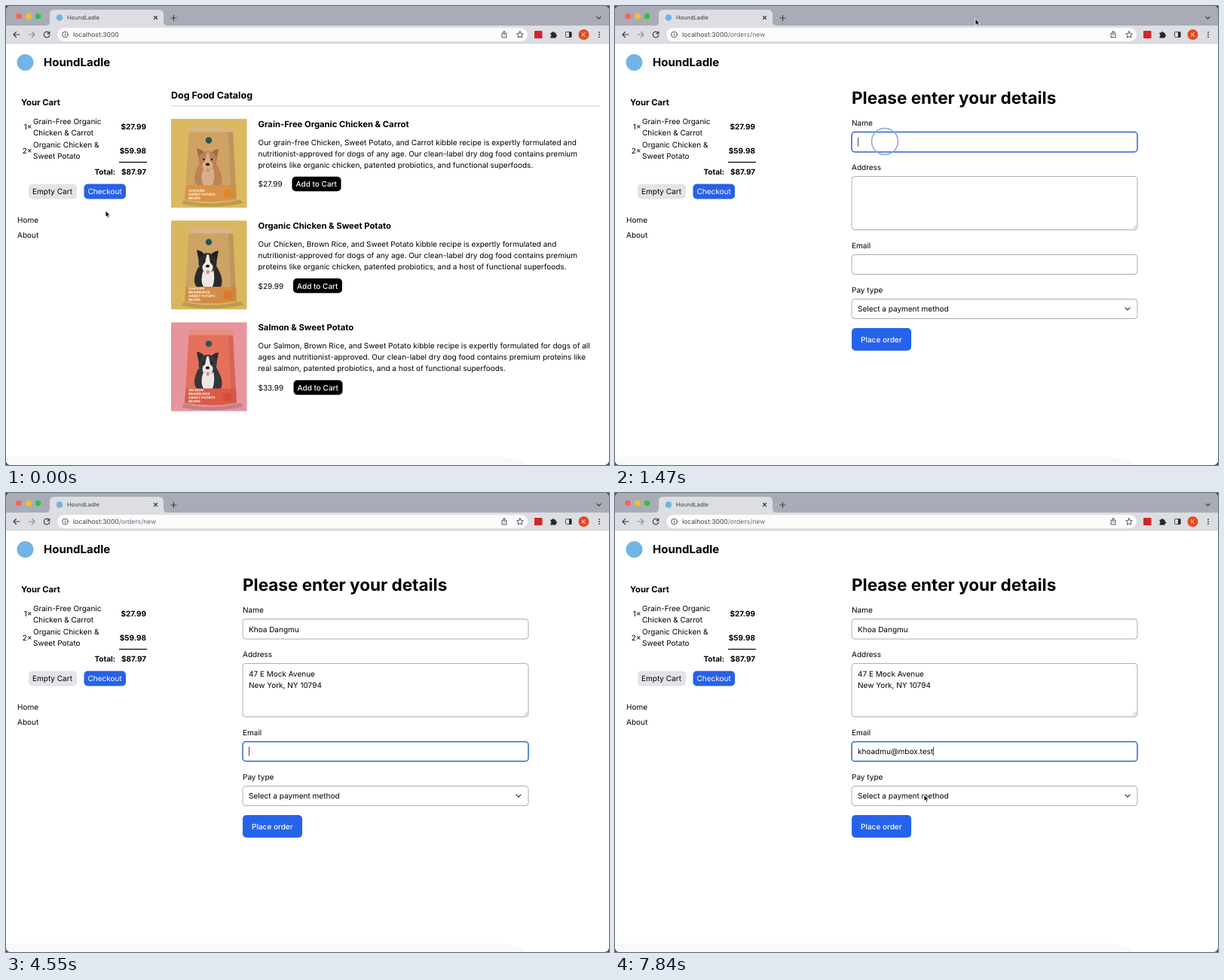
Animation, 800 px wide and 610 px high, one loop 8 s. Source, as an HTML page:

```html
<!DOCTYPE html>
<html lang="en">
<head>
<meta charset="utf-8">
<title>Shop checkout</title>
<style>
  html, body { margin: 0; width: 100%; height: 100%; overflow: hidden; background: #4a4a4c; }
  svg { display: block; width: 800px; height: 610px; }
  text { font: 400 10px Inter, sans-serif; fill: #000; text-rendering: geometricPrecision; white-space: pre; }
  .b { font-weight: 700; }
  .m { font-weight: 500; }
  .w { fill: #fff; }
  .end { text-anchor: end; }
  .h3 { font-size: 11.25px; }
  .h2 { font-size: 12.5px; }
  .brand { font-size: 15px; }
  .h1 { font-size: 22.5px; }
  .tab { font-size: 7.5px; fill: #3c4043; }
  .url { font-size: 8.6px; fill: #3c4043; }
  .pack { font-size: 4.5px; font-weight: 800; fill: #f8efd8; }
  .icon { fill: none; stroke: #3c4043; stroke-width: 1.2; stroke-linecap: round; stroke-linejoin: round; }
  .field { fill: #fff; stroke: #a9adb4; stroke-width: 1; }
  .field.on { stroke: #2f60d8; stroke-width: 1.5; }
</style>
</head>
<body>
<svg viewBox="0 0 800 610">
  <defs><clipPath id="win"><rect width="800" height="610" rx="6"/></clipPath></defs>
  <g clip-path="url(#win)">
    <rect width="800" height="610" fill="#fff"/>
    <path d="M0 599H655Q682 600 689 610H0Z" fill="#f9f9f9"/>

    <!-- browser bar -->
    <rect width="800" height="27" fill="#a9acb6"/>
    <rect y="26" width="800" height="24" fill="#dcdee4"/>
    <rect y="49" width="800" height="1" fill="#cfd1d6"/>
    <path d="M53 26Q58 26 58 21V11Q58 5 64 5H202Q209 5 209 11V21Q209 26 214 26Z" fill="#dcdee4"/>
    <circle cx="17" cy="13.5" r="3.8" fill="#f95f57"/>
    <circle cx="30" cy="13.5" r="3.8" fill="#f9bd2e"/>
    <circle cx="42.5" cy="13.5" r="3.8" fill="#2bc440"/>
    <circle cx="71" cy="15.5" r="4.3" fill="#72b4e6"/>
    <text class="tab" x="81" y="18.3">HoundLadle</text>
    <g class="icon">
      <path d="M196.5 13.5l4 4m0-4l-4 4M219 16h7m-3.5-3.5v7M784 14.5l2.5 2.5 2.5-2.5"/>
      <path d="M18 38h-8m3.5-3.5L10 38l3.5 3.5M57.6 36.5A3.8 3.8 0 1 0 57.8 39M57.8 34v2.8h-2.8"/>
      <path d="M30 38h8m-3.5-3.5L38 38l-3.5 3.5" stroke="#8c9096"/>
    </g>
    <rect x="68" y="29" width="624" height="18" rx="9" fill="#fbfbfc"/>
    <g class="icon" style="stroke-width:.9">
      <circle cx="78.5" cy="38" r="3.8"/><path d="M78.5 37.7v2M78.5 36v.1"/>
      <path d="M659.5 36.3h-1.5v5.5h6v-5.5h-1.5M661 39v-5.5m-1.7 1.7l1.7-1.7 1.7 1.7"/>
      <path d="M682 33.7l1.3 2.8 3 .4-2.2 2.1.5 3-2.6-1.5-2.6 1.5.5-3-2.2-2.1 3-.4z"/>
      <rect x="742.5" y="34.5" width="7.5" height="7" rx="1"/>
    </g>
    <text class="url" x="89" y="41">localhost:3000<tspan id="path" fill="#666a70">/orders/new</tspan></text>
    <rect x="701" y="33" width="10.5" height="10" rx="1" fill="#d3232b"/>
    <path d="M722.500 35.500h2a1.500 1.500 0 0 1 3 0h2v2.200a1.500 1.500 0 0 1 0 3V42.500h-7v-2a1.500 1.500 0 0 0 0-2.800z" fill="#24272b"/>
    <rect x="747" y="34.500" width="3.300" height="7" fill="#24272b"/>
    <circle cx="766.500" cy="38" r="7" fill="#e8471d"/>
    <text class="w" x="766.500" y="40.800" text-anchor="middle" style="font-size:8px">K</text>
    <path d="M787 35v.1m0 2.9v.1m0 2.900v.1" class="icon" style="stroke-width:1.900"/>

    <!-- header and cart -->
    <circle cx="25.500" cy="75" r="11" fill="#72b4e6"/>
    <text class="b brand" x="50" y="80">HoundLadle</text>
    <text class="b h3" x="20" y="132">Your Cart</text>
    <text class="end" x="34.500" y="164.300">1×</text>
    <text x="36" y="157">Grain-Free Organic</text>
    <text x="36" y="172">Chicken &amp; Carrot</text>
    <text class="b end" x="186" y="164.300">$27.99</text>
    <text class="end" x="34.500" y="195.500">2×</text>
    <text x="36" y="188">Organic Chicken &amp;</text>
    <text x="36" y="203">Sweet Potato</text>
    <text class="b end" x="186" y="195.500">$59.98</text>
    <rect x="150" y="207" width="37" height="1.200"/>
    <text class="b end" x="145" y="224.300">Total:</text>
    <text class="b end" x="186" y="224.300">$87.97</text>
    <rect x="30" y="236.500" width="64" height="20" rx="5" fill="#e2e4e8"/>
    <text x="35" y="250">Empty Cart</text>
    <rect x="103.500" y="236.500" width="55.500" height="20" rx="5" fill="#2761e8"/>
    <text class="w" x="108.500" y="250">Checkout</text>
    <text x="15" y="288">Home</text>
    <text x="15" y="307.500">About</text>

    <g id="catalog">
      <text class="b h2" x="219" y="122.500">Dog Food Catalog</text>
      <rect x="219" y="132.200" width="569" height="1.300" fill="#d8d9dc"/>
    </g>

    <g id="order">
      <text class="b h1" x="314" y="130">Please enter your details</text>
      <text x="314" y="158.700">Name</text>
      <text x="314" y="217.500">Address</text>
      <text x="314" y="321.500">Email</text>
      <text x="314" y="380.500">Pay type</text>
      <rect class="field" x="314" y="167.500" width="379" height="26.500" rx="4"/>
      <rect class="field" x="314" y="226.500" width="379" height="71" rx="4"/>
      <rect class="field" x="314" y="330.500" width="379" height="26" rx="4"/>
      <rect class="field" x="314" y="389.500" width="379" height="26" rx="4"/>
      <path d="M687 296l5-5m-2.500 5l2.500-2.500" stroke="#8a8d92" stroke-width=".7"/>
      <text x="322" y="406">Select a payment method</text>
      <path class="icon" d="M677 401l3 3 3-3"/>
      <rect x="314" y="428" width="79" height="30" rx="5" fill="#2563eb"/>
      <text class="m w" x="326" y="446.700">Place order</text>
      <g id="typed"></g>
      <rect id="caret" width=".9" height="12" fill="#333"/>
    </g>

    <circle id="ring" fill="none" stroke="#8fa7e6" stroke-width="1.500"/>
    <g id="cursor" stroke="#fff" stroke-width=".9">
      <path id="arrow" d="M0 0V8.600L2 6.800 3.500 10 5 9.300 3.600 6.200H6.300Z"/>
      <path id="hand" stroke="#222" fill="#fff" d="M.2 1Q1 0 1.700 1.200L2.700 4 5.800 4.200Q7 4.600 7 6.200L6.300 9.600H2.400L-.6 6.600Q-.6 5.600 1.200 6Z"/>
      <path id="beam" stroke="#222" fill="none" d="M-2-5Q0-5 0-3.500Q0-5 2-5M0-3.500V3.500M-2 5Q0 5 0 3.500Q0 5 2 5"/>
    </g>
  </g>
</svg>
<script>
const $ = id => document.getElementById(id);
const show = (el, on) => el.setAttribute('display', on ? 'inline' : 'none');

// Package pictures: backdrop, bag, coat, muzzle, tint of the ears
const looks = [
  { back: '#dcb960', bag: '#cfa264', coat: '#bd8253', face: '#d9ae86', ear: '#a9683f', foot: '#e0872e' },
  { back: '#d9b75f', bag: '#cda365', coat: '#2b2a2b', face: '#eeebe5', ear: '#222122', foot: '#d9782c' },
  { back: '#e6959d', bag: '#e4705a', coat: '#35363a', face: '#ece8e4', ear: '#2c2d31', foot: '#d64a3c' }
];

const products = [
  ['Grain-Free Organic Chicken & Carrot', '$27.99', 379.5, 'CHICKEN|SWEET POTATO|RECIPE', [
    'Our grain-free Chicken, Sweet Potato, and Carrot kibble recipe is expertly formulated and',
    'nutritionist-approved for dogs of any age. Our clean-label dry dog food contains premium',
    'proteins like organic chicken, patented probiotics, and functional superfoods.']],
  ['Organic Chicken & Sweet Potato', '$29.99', 381, 'CHICKEN|BROWN RICE|SWEET POTATO|RECIPE', [
    'Our Chicken, Brown Rice, and Sweet Potato kibble recipe is expertly formulated and',
    'nutritionist-approved for dogs of any age. Our clean-label dry dog food contains premium',
    'proteins like organic chicken, patented probiotics, and a host of functional superfoods.']],
  ['Salmon & Sweet Potato', '$33.99', 381.5, 'SALMON|BROWN RICE|SWEET POTATO|RECIPE', [
    'Our Salmon, Brown Rice, and Sweet Potato kibble recipe is expertly formulated for dogs of all',
    'ages and nutritionist-approved. Our clean-label dry dog food contains premium proteins like',
    'real salmon, patented probiotics, and a host of functional superfoods.']]
];

const label = (x, y, str, cls = '') =>
  `<text class="${cls}" x="${x}" y="${y}">${str.replace('&', '&amp;')}</text>`;

function picture(c, words) {
  const lines = words.split('|');
  return `<rect width="100.5" height="118" fill="${c.back}"/>
    <path d="M17 108Q52 117 92 107L96 112Q54 121 14 113Z" fill="#000" opacity=".15"/>
    <path d="M24 11Q52 8 82 11L87 107Q54 113 18 107Z" fill="${c.bag}"/>
    <path d="M24 11Q52 8 82 11L82.500 17H23.600Z" fill="#fff" opacity=".2"/>
    <path d="M76 18L82 18 86 105 80 106Z" fill="#000" opacity=".08"/>
    <circle cx="50" cy="28.500" r="4.200" fill="#24545a"/>
    <path d="M36 62Q27 80 34 88H66Q71 78 60 60Z" fill="${c.coat}"/>
    <path d="M43 65Q38 80 43 88H55Q59 77 56 65Z" fill="${c.face}"/>
    <path d="M37 54L34 39Q41 40 45 46H52Q57 40 63 40L60 56Z" fill="${c.ear}"/>
    <ellipse cx="48.500" cy="56" rx="12" ry="13" fill="${c.coat}"/>
    <path d="M47.500 45L45 56Q39 60 43 67Q48 72 54 67Q58 60 52 56L50 45Z" fill="${c.face}"/>
    <ellipse cx="48.500" cy="60.500" rx="2.600" ry="1.900" fill="#1d1a1a"/>
    <path d="M46.500 66H51L50 71H47.500Z" fill="#d9858a"/>
    <circle cx="43.500" cy="54" r="1.200" fill="#17120f"/><circle cx="54" cy="54" r="1.200" fill="#17120f"/>
    <path d="M20 88H86L87 107Q54 113 18 107Z" fill="${c.foot}" opacity=".55"/>
    <circle cx="75" cy="99" r="6" fill="${c.foot}"/>` +
    lines.map((s, i) => label(23, 106.5 - (lines.length - 1 - i) * 5, s, 'pack')).join('');
}

$('catalog').innerHTML += products.map(([name, price, bx, words, lines], i) => {
  const y = 150 + i * 135.2;
  return `<g transform="translate(219 ${y})">${picture(looks[i], words)}</g>` +
    label(334.5, y + 11, name, 'b h3') +
    lines.map((s, k) => label(334.5, y + 35 + k * 15, s)).join('') +
    label(334.5, y + 90.3, price) +
    `<rect x="${bx}" y="${y + 76.8}" width="65" height="19.500" rx="5"/>` +
    label(bx + 5, y + 90.3, 'Add to Cart', 'm w');
}).join('');

// Text fields: focus time, first and last key press
const fields = [
  { text: 'Khoa Dangmu', y: 184.5, focus: 1330, from: 2170, to: 3290 },
  { text: '47 E Mock Avenue\nNew York, NY 10794', y: 243.5, focus: 3430, from: 3500, to: 4340 },
  { text: 'khoadmu@mbox.test', y: 347, focus: 4480, from: 4620, to: 6716 }
];
const boxes = document.querySelectorAll('.field');
fields.forEach(f => {
  f.rows = f.text.split('\n').map((_, i) => {
    const row = document.createElementNS('http://www.w3.org/2000/svg', 'text');
    row.setAttribute('x', 322);
    row.setAttribute('y', f.y + i * 15);
    return $('typed').appendChild(row);
  });
});

function drawFields(t) {
  const active = fields.findLastIndex(f => t >= f.focus);
  show($('caret'), active >= 0);
  fields.forEach((f, i) => {
    const step = (f.to - f.from) / (f.text.length - 1);
    const count = t < f.from ? 0 : Math.floor((t - f.from) / step + 1.001);
    const parts = f.text.slice(0, count).split('\n');
    f.rows.forEach((row, k) => row.textContent = parts[k] || '');
    boxes[i].classList.toggle('on', i === active);
    if (i !== active) return;
    const last = parts.length - 1;
    const w = parts[last] ? f.rows[last].getComputedTextLength() : 0;
    $('caret').setAttribute('x', 322 + w);
    $('caret').setAttribute('y', f.y + last * 15 - 9.7);
  });
}

// Pointer stops: time, x, y
const stops = [
  [0, 132, 272], [420, 136, 248], [560, 136, 248], [1260, 358, 180], [1330, 358, 180],
  [1470, 478, 17], [1680, 515, 18], [7070, 515, 18], [7840, 410, 401]
];

function pointerAt(t) {
  const i = Math.max(1, stops.findIndex(s => t <= s[0]));
  const [a, b] = [stops[i - 1], stops[i]];
  const p = (t - a[0]) / (b[0] - a[0]);
  const e = p * p * (3 - 2 * p);
  return [a[1] + (b[1] - a[1]) * e, a[2] + (b[2] - a[2]) * e];
}

function drawPointer(t, ordering) {
  const [x, y] = pointerAt(t);
  const inX = x > 314 && x < 693;
  const beam = ordering && inX && [[167, 194], [226, 298], [330, 357]].some(([a, b]) => y > a && y < b);
  const hand = !ordering && x > 103 && x < 166 && y > 236 && y < 257;
  show($('cursor'), t < 1750 || t >= 7140);
  show($('beam'), beam);
  show($('hand'), hand);
  show($('arrow'), !beam && !hand);
  $('cursor').setAttribute('transform', `translate(${x} ${y})`);
}

const clicks = [[560, 136, 248], [1330, 358, 180]];

function drawRing(t) {
  const hit = clicks.find(([at]) => t >= at && t < at + 280);
  show($('ring'), hit);
  if (!hit) return;
  const p = Math.min(1, (t - hit[0]) / 140);
  $('ring').setAttribute('cx', hit[1]);
  $('ring').setAttribute('cy', hit[2]);
  $('ring').setAttribute('r', 9 + 8.5 * p);
  $('ring').setAttribute('opacity', t - hit[0] > 200 ? 0.5 : 1);
}

function draw(now) {
  const t = Math.min(7840, Math.floor((now % 8000) / 70) * 70);
  const ordering = t >= 840;
  show($('catalog'), !ordering);
  show($('order'), ordering);
  show($('path'), ordering);
  drawFields(t);
  drawPointer(t, ordering);
  drawRing(t);
}

const start = performance.now();
function loop() {
  draw(performance.now() - start);
  requestAnimationFrame(loop);
}
loop();
</script>
</body>
</html>
```
